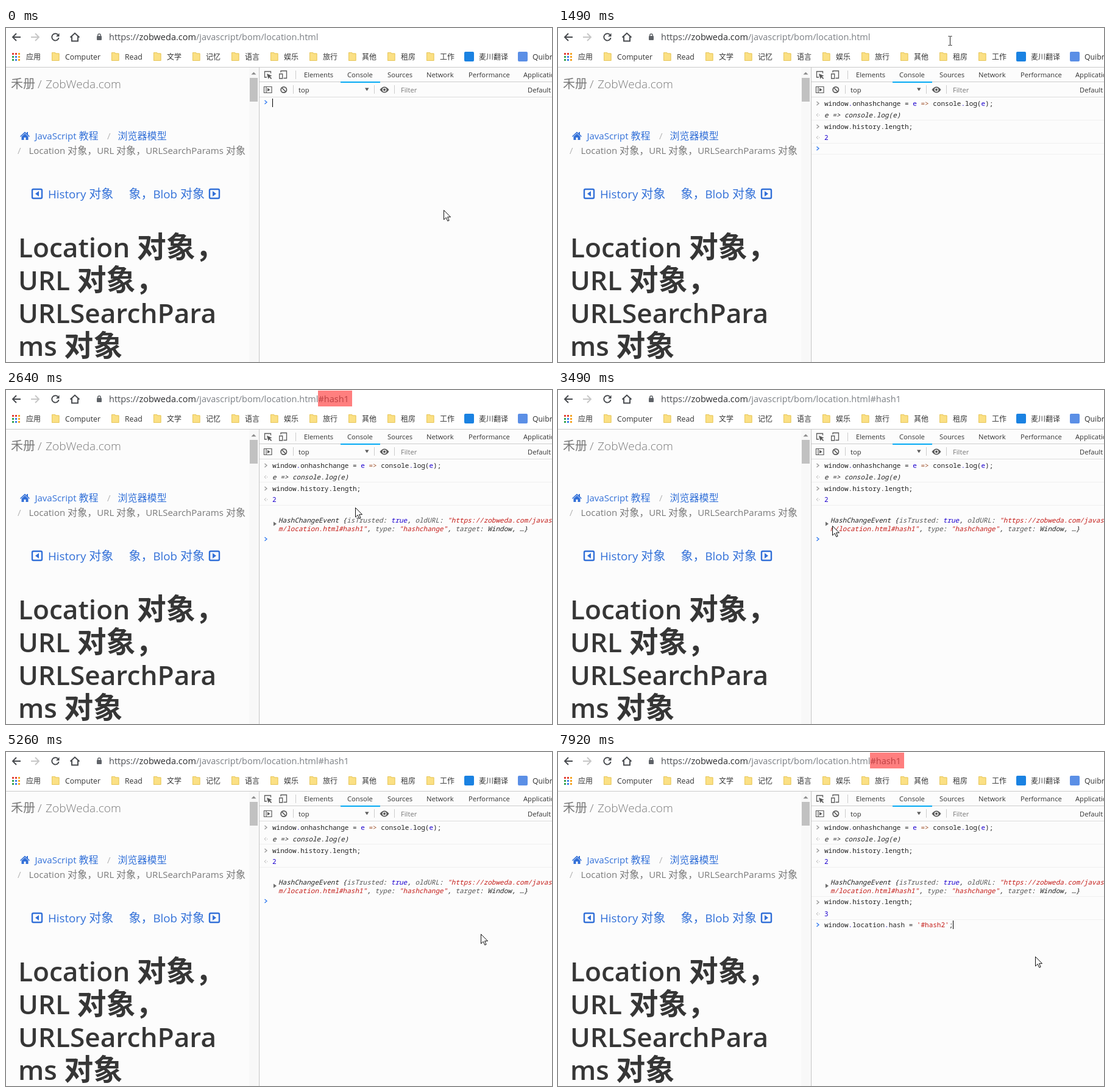
Recreate the animation shown at these times as an HTML page. Size 896 by 549 pixels, loop 8 s.

```html
<!DOCTYPE html>
<html lang="zh">
<head>
<meta charset="utf-8">
<style>
html, body { margin: 0; width: 100%; height: 100%; overflow: hidden; background: #fcfcfc }
svg { display: block; font-family: "Open Sans", "Noto Sans CJK SC", sans-serif }
text { white-space: pre }
.han { font-size: 1.07em }
.head .han { font-size: 48px; font-weight: 700 }
.code { font: 11px "Noto Sans Mono", "DejaVu Sans Mono", monospace; fill: #222 }
.it { font-style: italic }
.key { fill: #881391 }
.dim, .it .key { fill: #565656 }
.str { fill: #c41a16 }
.val { fill: #1c00cf }
.arrow { fill: #a0522d }
</style>
</head>
<body>
<svg id="stage" width="896" height="549" viewBox="0 0 896 549"></svg>
<script>
const LOOP = 8000, END = LOOP, SITE = 'zobweda.com';
const stage = document.getElementById('stage');

const text = (x, y, size, str, fill, extra = '') =>
  `<text x="${x}" y="${y}" font-size="${size}" fill="${fill}" ${extra}>` +
  str.replace(/[\u3000-\u9fff\uff00-\uffef]+/g, '<tspan class="han">$&</tspan>') + '</text>';
const rect = (x, y, w, h, fill, extra = '') =>
  `<rect x="${x}" y="${y}" width="${w}" height="${h}" fill="${fill}" ${extra}/>`;
const line = (d, color, width = 1, extra = '') =>
  `<path d="${d}" fill="none" stroke="${color}" stroke-width="${width}" ${extra}/>`;
const shape = (d, fill) => `<path d="${d}" fill="${fill}"/>`;

// Console text, coloured by token
const TOKEN = /("[^"]*"?|'[^']*'|^m\/[^"]*")|(\b(?:true|false|[\d.]+|e)\b)|(\w+(?=:))|(=>)/g;
const paint = s => s.replace(TOKEN, (m, str, val, key) =>
  `<tspan class="${str ? 'str' : val ? 'val' : key ? 'key' : 'arrow'}">${m}</tspan>`);
const code = (x, cy, html, cls = '') =>
  `<text class="code ${cls}" x="${x}" y="${cy + 4}">${html}</text>`;
const prompt = (y, color) => line(`M424.5 ${y - 3}l3.5 3l-3.5 3`, color, 1.4);
const active = y => prompt(y, '#367cf1');
const past = y => prompt(y, '#9a9a9a');
const caret = (x, y) => rect(x, y - 7, 1, 14, '#000');
const result = (y, html, cls) =>
  line(`M427 ${y - 2.5}l-3 2.5l3 2.5`, '#b8b8b8') + rect(428, y - .5, 1.2, 1.2, '#b8b8b8') + code(437, y, html, cls);
const rule = y => rect(416, y, 480, 1, '#f0f0f0');
const right = (x, y) => shape(`M${x} ${y - 3.5}l5 3.5l-5 3.5z`, '#6e6e6e');

const timed = [];
const show = (html, ...spans) => timed.push({ html, spans });

function browserBar() {
  const ink = '#46494d';
  let s = rect(0, 0, 896, 64, '#fff') + rect(0, 64, 896, 1, '#c9c9c9') +
    line('M24 15H11.5M17 9L11 15l6 6', ink, 1.9) +
    line('M41 15h12.5M48 9l6 6l-6 6', '#c6c6c6', 1.9) +
    line('M85.2 11A5.7 5.7 0 1 0 86.6 16', ink, 1.9) + shape('M87.5 8.5v5.5h-5.5z', ink) +
    line('M105.5 15.5L113 8.5l7.5 7M108 14v7.5h10V14', ink, 1.9);
  ['#e33b2e', '#e33b2e', '#f4a322', '#30a24c', '#3b7ded', '#f4a322', '#30a24c', '#3b7ded', '#f4a322']
    .forEach((c, i) => s += rect(10 + i % 3 * 5, 41 + (i / 3 | 0) * 5, 3, 3, c));
  s += text(33, 52, 11.2, '应用', '#333');
  ['Computer', 'Read', '文学', '记忆', '语言', '娱乐', '旅行', '其他', '租房', '工作'].forEach((name, i) => {
    const x = i < 2 ? 97 + 98 * i : 136 + 64 * i;
    s += shape(`M${x - 22} 40h6l1 1.5h5.5V54h-12.5z`, '#fbe084') +
      line(`M${x - 21.5} 40.5h5l1 1.5h5.5v11.5h-11.5z`, '#e6c65c') +
      text(x, 52, i < 2 ? 12.3 : 11.2, name, '#333');
  });
  return s + rect(752, 39, 16, 16, '#1a82e2', 'rx="2"') + text(776, 52, 11.2, '麦川翻译', '#333') +
    rect(840, 39, 16, 16, '#5b8fe6', 'rx="2"') + text(864, 52, 12.3, 'Quibro 翻译', '#333');
}

function page() {
  const blue = '#3270d8', grey = '#7a7a7a';
  const box = (x, dir) => rect(x + 1, 265, 16, 15, 'none', `rx="2" stroke="${blue}" stroke-width="2.4"`) +
    shape(`M${x + 9 + 3 * dir} 272.5l${-6 * dir} -4.5v9z`, blue);
  let s = text(8, 99, 18.7, '禾册', grey, 'font-weight="300"') +
    text(52, 99, 19.1, '/', grey, 'font-weight="300"') +
    text(65, 99, 19.1, 'ZobWeda.com', grey, 'font-weight="300"') +
    shape('M23 178l8-7.5l3 2.8V171h2v4l3 3l-1 1l-7-6.3l-7 6.3zM25.500 178.500l5.500-5l5.500 5V184h-4v-4h-3v4h-4z', blue) +
    text(47.5, 183, 15, 'JavaScript 教程', blue) + text(166, 183, 15, '/', '#b5b5b5') +
    text(183.5, 183, 15, '浏览器模型', blue) + text(19, 207, 15, '/', '#b5b5b5') +
    text(37.5, 207, 15, 'Location 对象，URL 对象，URLSearchParams 对象', grey) +
    box(42, -1) + text(69, 280, 18.7, 'History 对象', blue) +
    text(201.5, 280, 18.7, '象，Blob 对象', blue) + box(333, 1);
  ['Location 对象，', 'URL 对象，', 'URLSearchPara', 'ms 对象'].forEach((row, i) =>
    s += text(20, 377 + 54 * i, 44.2, row, '#363636', 'class="head" font-weight="600"'));
  return s + rect(399, 65, 15, 484, '#f8f8f8') + rect(400, 82, 13, 39, '#c1c1c1') +
    shape('M402.500 76.500l4-4l4 4z', '#8a8a8a');
}

function devtools() {
  const ink = '#5a5a5a', sep = (x, y) => rect(x, y, 1, 14, '#ccc');
  let s = rect(415, 65, 1, 484, '#c4c4c4') + rect(416, 88, 480, 1, '#ccc') + rect(416, 113, 480, 1, '#ddd') +
    rect(549, 88, 65, 2, '#03a9f4') +
    line('M428 81h-3.500v-9.500h10v3', ink, 1.3) + shape('M428 75l8.500 3.500l-3.300 1.300l3 3l-1.200 1.200l-3-3l-1.500 3z', ink) +
    line('M451 73v-2.500h9.500v12h-5M448.700 75.500h5v7.500h-5z', ink, 1.3) + sep(475, 70);
  [[489, 'Elements'], [560, 'Console'], [626, 'Sources'], [690, 'Network'], [759, 'Performance'], [849, 'Application']]
    .forEach(([x, name]) => s += text(x, 81, 11.2, name, '#333'));
  return s + line('M423.500 96.500h12.500v10h-12.500zM427 96v11', ink, 1.2) + shape('M429 98.500l4.500 3l-4.500 3z', ink) +
    line('M460.500 101.500a4.700 4.700 0 1 0-9.400 0a4.700 4.700 0 1 0 9.400 0M452.500 98l6.600 7', ink, 1.7) +
    sep(471, 94) + text(480, 106, 11.2, 'top', '#333') + shape('M589 98.500h6.500l-3.200 5z', ink) + sep(604, 94) +
    shape('M613.500 101.500q7.500-10 15 0q-7.500 10-15 0', ink) +
    '<circle cx="621" cy="101.500" r="2.700" fill="#5a5a5a" stroke="#fff" stroke-width="1.300"/>' +
    sep(637, 94) + text(648, 106, 11.2, 'Filter', '#777') + text(856, 106, 11.2, 'Default levels', '#333');
}

function consoleLog() {
  const LEN = 'window.history.length;';
  const assign = code(437, 124, paint('window.onhashchange = e => console.log(e);'));
  show(active(122) + caret(437, 123), [0, 80]);
  show(assign, [80, END]);
  show(active(124) + caret(714, 124), [80, 150]);
  show(past(124) + result(143, 'e => console.log(e)', 'it') + rule(151), [150, END]);
  show(active(162), [150, 600]);
  show(caret(437, 162), [150, 370]);
  show(code(437, 162, LEN), [370, END]);
  show(caret(582, 162), [370, 600]);
  show(past(162) + result(180, paint('2')) + rule(189), [600, END]);
  show(active(198) + rule(207), [600, 2420]);

  show(code(447, 214, paint(`HashChangeEvent {isTrusted: true, oldURL: "https://${SITE}/javascript/bo`), 'it') +
    code(447, 228, paint('m/location.html#hash1", type: "hashchange", target: Window, …}'), 'it'), [2420, END]);
  show(right(439, 220) + active(245), [2420, 3890], [4720, 6970]);
  show(right(439, 220), [6970, END]);

  const win = ': <tspan class="dim">Window {postMessage: <tspan class="it">ƒ</tspan>, blur: <tspan class="it">ƒ</tspan>, ' +
    'focus: <tspan class="it">ƒ</tspan>, close: <tspan class="it">ƒ</tspan>, parent: Window, …}</tspan>';
  const url = `"https://${SITE}/javascript/bom/location.html`;
  const fields = ['bubbles: false', 'cancelBubble: false', 'cancelable: false', 'composed: false', '+currentTarget',
    'defaultPrevented: false', 'eventPhase: 0', 'isTrusted: true', `newURL: ${url}#hash1"`, `oldURL: ${url}"`,
    '>path: [Window]', 'returnValue: true', '+srcElement', '+target', 'timeStamp: 46882.600000011735',
    'type: "hashchange"', '>__proto__: HashChangeEvent'];
  const open = fields.map((f, i) => {
    const y = 242 + 14.375 * i, folded = /^[+>]/.test(f), name = folded ? f.slice(1) : f;
    const html = f[0] == '+' ? `<tspan class="key">${name}</tspan>${win}` : paint(name);
    return (folded ? right(450, y) : '') +
      code(458, y, html.replace('"key">__', '"key" fill-opacity=".6">__'));
  }).join('');
  show(shape('M437.500 218h7l-3.500 5z', '#6e6e6e') + open + active(490) +
    rect(861, 223, 10, 10, '#a9cdf0', 'rx="2"') + rect(865.3, 225, 1.5, 1.5, '#fff') + rect(865.3, 227.5, 1.5, 4, '#fff'),
    [3890, 4720]);

  show(caret(437, 246), [6000, 6350]);
  show(code(437, 246, LEN), [6650, END]);
  show(caret(582, 246), [6650, 6970]);
  show(past(247) + result(266, paint('3')) + rule(237) + rule(275) + active(284), [6970, END]);
  show(caret(437, 284), [6970, 7200]);
  show(code(437, 284, paint("window.location.hash = '#hash2';")) + caret(648, 284), [7200, END]);
}

consoleLog();
// Tooltip, fading away
show(rect(476.5, 118.5, 115, 18, '#fff', 'fill-opacity=".3" stroke="#e6e6e6"') +
  text(483, 131, 11, 'JavaScript contexts', '#c8c8c8'), [900, 1070]);
show(rect(149, 13, 8, 7, '#5f6368', 'rx="1"') + line('M150.700 13.500v-1.500a2.300 2.300 0 0 1 4.600 0v1.500', '#5f6368', 1.4),
  [0, 1880], [2420, END]);
show('<circle cx="153" cy="15" r="6.500" fill="#5f6368"/>' +
  shape('M148 13l3 1l2 2l-1 3l-2-1zM152 9.500l4 1l-1 2.500l3 1l-1 3l-2-2l-3-2z', '#fff'), [1880, 2420]);

stage.innerHTML = rect(0, 0, 896, 549, '#fcfcfc') + page() + devtools() + browserBar() +
  timed.map(p => `<g class="timed">${p.html}</g>`).join('') +
  `<text id="url" y="20" font-size="14.5" fill="#7b7f84"><tspan id="scheme">https://</tspan><tspan fill="#2b2c2e">${SITE}</tspan>` +
  '/javascript/bom/location.html<tspan id="hash"></tspan></text>' + rect(0, 5, 1, 18, '#222', 'id="bar"') +
  rect(512, 1, 56, 26, '#f00', 'id="hashMark"') + rect(455, 348, 429, 33, '#f00', 'id="urlMark"') +
  '<path id="pointer" d="M.5.5v15.500l3.700-3.500l2.600 5.800l2.300-1l-2.500-5.600h4.900z" fill="#fff" stroke="#111"/>' +
  line('M640.500 13.500h2q1 0 1 1q0-1 1-1h2M643.500 14v14M640.500 28.500h2q1 0 1-1q0 1 1 1h2', '#222', 1, 'id="beam"');

const el = id => document.getElementById(id);
const groups = [...document.querySelectorAll('.timed')];
const within = (t, spans) => spans.some(([a, b]) => t >= a && t < b);
const toggle = (node, on) => node.setAttribute('display', on ? 'inline' : 'none');
const clamp = (v, lo, hi) => Math.min(hi, Math.max(lo, v));
const fade = (t, a, b) => .5 * clamp(Math.min((t - a) / 150, (b - t) / 150), 0, 1);

// Pointer path: time, x, y
const path = [[0, 718, 299], [80, 718, 299], [600, 844, 187], [780, 575, 105], [880, 576, 100], [990, 576, 61], [1050, 576, 61],
  [1200, 643, 21], [2420, 643, 21], [2640, 573, 193], [2710, 573, 193], [3180, 455, 223], [3490, 450, 223], [3720, 438, 213],
  [4210, 455, 241], [4250, 455, 241], [4640, 445, 222], [5020, 445, 222], [5060, 814, 232], [5260, 779, 299],
  [5490, 749, 292], [5810, 809, 240], [6350, 703, 264], [7200, 703, 264], [7600, 783, 336], [END, 783, 336]];
const pointerSpans = [[0, 80], [600, 1200], [2450, 5100], [5260, 5640], [5810, END]];

function pointerAt(t) {
  const i = path.findIndex(p => p[0] > t), [a, x, y] = path[i - 1], [b, u, v] = path[i], k = (t - a) / (b - a);
  return [x + (u - x) * k, y + (v - y) * k].map(Math.round);
}

function frame(now) {
  const t = now % LOOP, editing = within(t, [[1880, 2420]]);
  groups.forEach((g, i) => toggle(g, within(t, timed[i].spans)));

  const typed = t < 1880 ? 0 : clamp(1 + Math.floor((t - 1990) / 36), 1, 6), x = editing ? 180 : 169;
  el('hash').textContent = '#hash1'.slice(0, typed);
  el('hash').setAttribute('fill', editing ? '#4a4c50' : '#7b7f84');
  el('scheme').setAttribute('fill', editing ? '#7b7f84' : '#4a4c50');
  el('url').setAttribute('x', x);
  el('bar').setAttribute('x', Math.round(x + el('url').getComputedTextLength()));
  toggle(el('bar'), editing);

  el('hashMark').setAttribute('opacity', Math.max(fade(t, 2420, 3180), fade(t, 7450, 8400)));
  el('urlMark').setAttribute('opacity', fade(t, 3930, 4640));
  el('pointer').setAttribute('transform', `translate(${pointerAt(t)})`);
  toggle(el('pointer'), within(t, pointerSpans));
  toggle(el('beam'), within(t, [[1200, 2450]]));
  requestAnimationFrame(frame);
}
requestAnimationFrame(frame);
</script>
</body>
</html>
```
